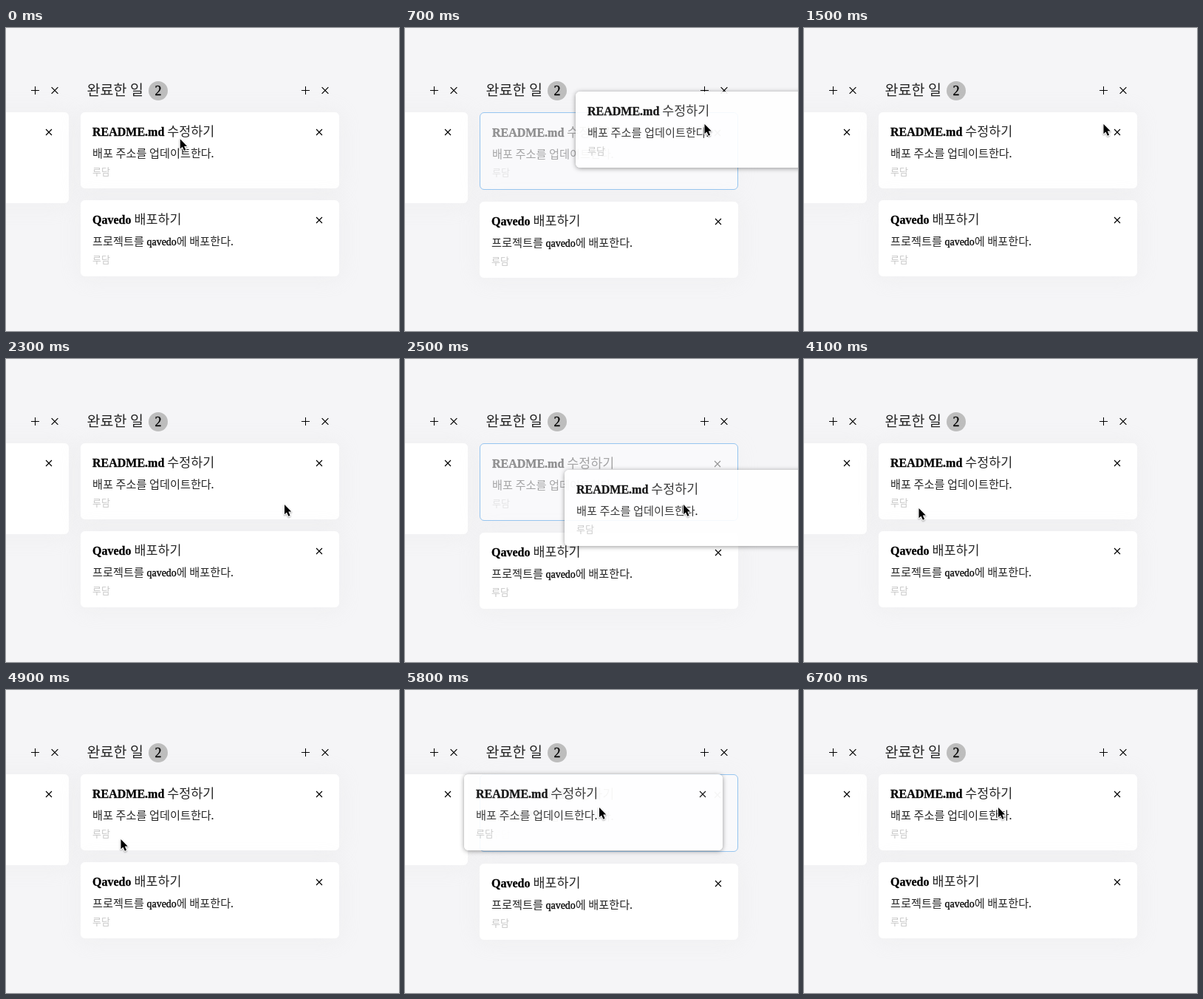
An HTML page with a canvas for the animation above (7400 ms loop, 532x410 px).

```html
<!DOCTYPE html>
<html lang="ko">
<head>
<meta charset="utf-8">
<title>Board</title>
<style>
html, body { margin: 0; width: 100%; height: 100%; overflow: hidden; background: #f5f5f7; }
canvas { display: block; }
</style>
</head>
<body>
<canvas id="stage" width="532" height="410"></canvas>
<script>
const W = 532, H = 410, LOOP = 7400, STEP = 100;
const c = document.getElementById('stage').getContext('2d');

// Each drag: the pointer goes to grab, then to drop; the preview shows a little later.
const home = { x: 235.8, y: 150.3 };
const drags = [
  { move: [100, 400], show: [700, 1500], grab: { x: 275.5, y: 158 }, drop: { x: 405.5, y: 130 } },
  { move: [1600, 2300], show: [2500, 3200], grab: { x: 262, y: 161 }, drop: { x: 377, y: 197 } },
  { move: [3400, 4100], show: [4300, 4900], grab: { x: 300, y: 200 }, drop: { x: 155.5, y: 202 } },
  { move: [5000, 5500], show: [5800, 6700], grab: { x: 284, y: 159 }, drop: { x: 263, y: 159 } }
];

const tasks = [
  { title: 'README.md 수정하기', body: '배포 주소를 업데이트한다.' },
  { title: 'Qavedo 배포하기', body: '프로젝트를 qavedo에 배포한다.' }
];

// Korean runs are set lighter and in a size that keeps one em per syllable.
function text(str, x, y, size, color = '#000', bold = false) {
  for (const run of str.match(/[가-힣]+|[^가-힣]+/g)) {
    const korean = /[가-힣]/.test(run);
    c.save();
    c.fillStyle = c.strokeStyle = color;
    if (korean) {
      c.font = `300 ${size * 1.087}px "Noto Sans CJK KR", "Noto Sans CJK", sans-serif`;
      c.globalAlpha *= .85;
    } else {
      c.font = `${bold ? 700 : 400} ${size}px "Liberation Serif", serif`;
      c.lineWidth = .3;
      c.strokeText(run, x, y);
    }
    c.fillText(run, x, y);
    x += c.measureText(run).width;
    c.restore();
  }
}

// A plus sign, or a cross when turned by 45 degrees.
function sign(x, y, r, width, turn = 0) {
  c.save();
  c.translate(x, y);
  c.rotate(turn);
  c.lineWidth = width;
  c.strokeStyle = '#000';
  c.beginPath();
  c.moveTo(-r, 0);
  c.lineTo(r, 0);
  c.moveTo(0, -r);
  c.lineTo(0, r);
  c.stroke();
  c.restore();
}

const cross = (x, y, r) => sign(x, y, r, 1.2, Math.PI / 4);

function box(x, y, w, h, blur = 30, shadow = 'rgba(224,224,224,.3)') {
  const shape = new Path2D(), outside = new Path2D();
  shape.roundRect(x, y, w, h, 6);
  outside.rect(0, 0, W, H);
  outside.addPath(shape);
  c.fillStyle = '#fff';
  c.save();
  c.clip(outside, 'evenodd');
  c.shadowColor = shadow;
  c.shadowBlur = blur;
  c.shadowOffsetY = 1;
  c.fill(shape);
  c.restore();
  c.fill(shape);
}

function card({ title, body }, x, y, { alpha = 1, border = 0, blur, shadow } = {}) {
  c.save();
  c.globalAlpha = alpha;
  box(x, y, 350, 103 + 2 * border, blur, shadow);
  if (border) {
    c.strokeStyle = '#0075de';
    c.lineWidth = border;
    c.beginPath();
    c.roundRect(x + .5, y + .5, 349, 104, 5.5);
    c.stroke();
  }
  const left = x + 16 + border, top = y + border;
  text(title, left, top + 32, 16, '#000', true);
  text(body, left, top + 61, 14);
  text('루담', left, top + 85, 12, '#bdbdbd');
  cross(x + 323 - border, top + 27, 5.6);
  c.restore();
}

function header(x) {
  sign(x + 39.5, 84.5, 5.5, 1);
  cross(x + 66, 84.5, 6.2);
}

function glide(a, b, k) {
  const e = (1 - Math.cos(Math.PI * k)) / 2;
  return { x: a.x + (b.x - a.x) * e, y: a.y + (b.y - a.y) * e };
}

function pointerAt(t) {
  let pos = home;
  for (const { move: [start, end], grab, drop } of drags) {
    if (t <= start) break;
    const k = Math.min(1, (t - start) / (end - start)) * 2;
    pos = k < 1 ? glide(pos, grab, k) : glide(grab, drop, k - 1);
  }
  return pos;
}

function pointer({ x, y }) {
  const arrow = new Path2D('M0 0V13.2L3 10.4L5.4 15.8L7.6 14.8L5.3 9.6H9.3Z');
  c.save();
  c.translate(x, y);
  c.strokeStyle = '#fff';
  c.lineWidth = 2;
  c.lineJoin = 'round';
  c.shadowColor = 'rgba(0,0,0,.35)';
  c.shadowBlur = 2;
  c.shadowOffsetY = 1;
  c.stroke(arrow);
  c.shadowColor = 'transparent';
  c.fillStyle = '#000';
  c.fill(arrow);
  c.restore();
}

function draw(now) {
  const t = Math.floor(now % LOOP / STEP) * STEP;
  const drag = drags.find(({ show: [start, end] }) => t >= start && t < end);

  c.fillStyle = '#f5f5f7';
  c.fillRect(0, 0, W, H);

  header(0);
  header(366);
  text('완료한 일', 109.5, 91, 18);
  c.fillStyle = '#bdbdbd';
  c.beginPath();
  c.arc(206, 85, 13, 0, 2 * Math.PI);
  c.fill();
  text('2', 201.5, 91, 18);

  box(-265, 114, 350, 123);
  cross(58, 141, 5.6);

  card(tasks[0], 101, 114, drag && { alpha: .4, border: 1 });
  card(tasks[1], 101, drag ? 235 : 233);
  if (drag) {
    const { grab, drop } = drag;
    card(tasks[0], 101 + drop.x - grab.x, 114 + drop.y - grab.y,
      { alpha: .9, blur: 6, shadow: 'rgba(0,0,0,.45)' });
  }
  pointer(pointerAt(t));
}

function loop() {
  draw(performance.now());
  requestAnimationFrame(loop);
}
loop();
</script>
</body>
</html>
```
